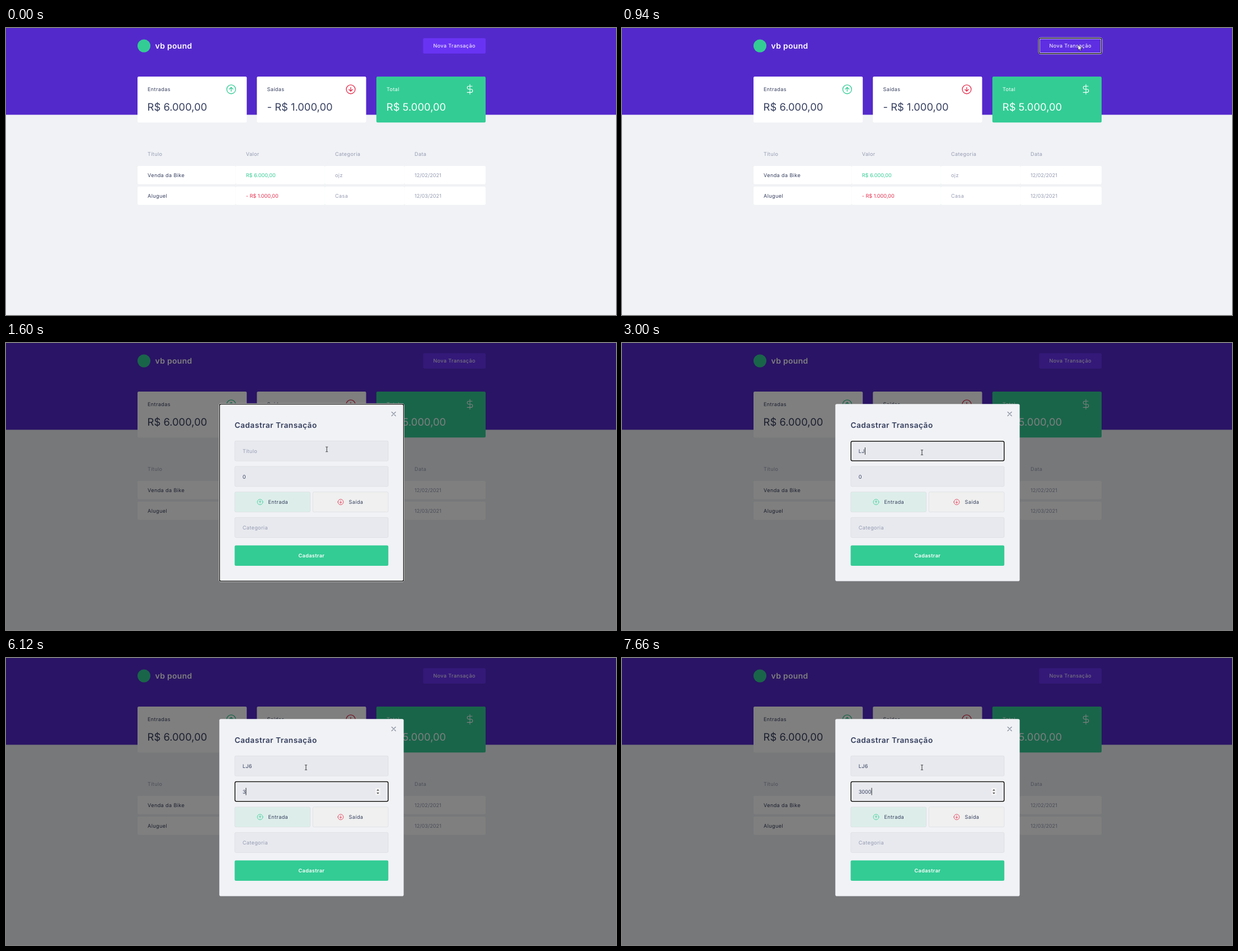
Animation of 1090x514 px, one loop 8 s. Source, as an HTML page:

```html
<!DOCTYPE html>
<html lang="pt-BR">
<head>
<meta charset="utf-8">
<title>Transações</title>
<style>
  html, body { margin: 0; width: 100%; height: 100%; overflow: hidden; background: #f0f2f5; }
  svg { display: block; width: 100%; height: 100%; }
  text {
    font: 400 9.14px Inter, "Open Sans", sans-serif;
    letter-spacing: .04em;
    fill: #363f5f;
    text-rendering: geometricPrecision;
    white-space: pre;
  }
  .num text, text.num { letter-spacing: 0; }
  .muted, .muted text { fill: #969cb3; }
  .light { fill: #fff; }
  text.money { font-size: 18.4px; letter-spacing: 0; }
  .brand { font-size: 14px; font-weight: 600; letter-spacing: .02em; }
  .title { font-size: 13.7px; font-weight: 600; letter-spacing: .035em; }
  .strong { font-weight: 600; }
  .middle { text-anchor: middle; }
  .green { fill: #33cc95; }
  .red { fill: #e52e4d; }
  .icon { fill: none; stroke-width: 1.35; stroke-linecap: round; stroke-linejoin: round; }
  .up { stroke: #33cc95; }
  .down { stroke: #e52e4d; }
  .field { fill: #e7e9ee; stroke: #d7d9dd; stroke-width: .6; }
</style>
</head>
<body>
<svg viewBox="0 0 1090 514" preserveAspectRatio="none">
  <defs>
    <g id="arrow">
      <circle r="7.9"/>
      <path d="M0 3.5V-3.4M-3.2-.3 0-3.5 3.2-.3"/>
    </g>
  </defs>

  <rect width="1090" height="155.4" fill="#5429cc"/>
  <circle class="green" cx="246.5" cy="32" r="11.5"/>
  <text class="brand light" x="266.6" y="36.8">vb pound</text>
  <rect id="newButton" x="745.3" y="18.3" width="111.7" height="27.4" rx="2.3"/>
  <text class="light middle" x="801.2" y="35.3">Nova Transação</text>

  <g fill="#fff">
    <rect x="235" y="87" width="195.2" height="82.2" rx="2.3"/>
    <rect x="448.3" y="87" width="195.2" height="82.2" rx="2.3"/>
    <rect class="green" x="661.8" y="87" width="195.2" height="82.2" rx="2.3"/>
  </g>
  <text x="253" y="113.3">Entradas</text>
  <text x="466.5" y="113.3">Saídas</text>
  <text class="light" x="680" y="113.3">Total</text>
  <text class="money" x="252.6" y="148.4">R$ 6.000,00</text>
  <text class="money" x="466.5" y="148.4">- R$ 1.000,00</text>
  <text class="money light" x="679.8" y="148.4">R$ 5.000,00</text>
  <use href="#arrow" class="icon up" transform="translate(402.4 109.8)"/>
  <use href="#arrow" class="icon down" transform="translate(616 109.8) rotate(180)"/>
  <path class="icon" stroke="#fff" stroke-width="1.6" transform="translate(819.4 100.2) scale(.8)"
        d="M12 1V23M17 5H9.5a3.5 3.5 0 0 0 0 7h5a3.5 3.5 0 0 1 0 7H6"/>

  <g class="muted">
    <text x="253" y="229.4">Título</text>
    <text x="428.7" y="229.4">Valor</text>
    <text x="588" y="229.4">Categoria</text>
    <text x="730" y="229.4">Data</text>
  </g>
  <g id="cells" fill="#fff"></g>
  <text x="253" y="266.6">Venda da Bike</text>
  <text class="num green" x="428.7" y="266.6">R$ 6.000,00</text>
  <text class="muted" x="588" y="266.6">ojz</text>
  <text class="num muted" x="730" y="266.6">12/02/2021</text>
  <text x="253" y="303.6">Aluguel</text>
  <text class="num red" x="428.7" y="303.6">- R$ 1.000,00</text>
  <text class="muted" x="588" y="303.6">Casa</text>
  <text class="num muted" x="730" y="303.6">12/03/2021</text>

  <g id="modal">
    <rect width="1090" height="514" opacity=".5"/>
    <rect x="381.2" y="109.3" width="329.4" height="317.2" rx="2.8" fill="#f0f2f5"/>
    <path id="close" class="icon" stroke="#8c92a0" stroke-width="1" d="m689.2 123.6 7 7m0-7-7 7"/>
    <text class="title" x="408.4" y="151.6">Cadastrar Transação</text>
    <rect class="field" x="408.8" y="175.3" width="274.2" height="36" rx="2.3"/>
    <rect class="field" x="408.8" y="221" width="274.2" height="36" rx="2.3"/>
    <rect class="field" x="408.8" y="266.7" width="134.8" height="36" rx="2.3" style="fill:#ddeeea"/>
    <rect class="field" x="548.2" y="266.7" width="134.8" height="36" rx="2.3" style="fill:#eff0ef"/>
    <rect class="field" x="408.8" y="312.4" width="274.2" height="36" rx="2.3"/>
    <rect class="green" x="408.6" y="362.5" width="274.6" height="36.6" rx="2.3"/>
    <use href="#arrow" class="icon up" transform="translate(454 284.8) scale(.62)"/>
    <use href="#arrow" class="icon down" transform="translate(598 284.8) scale(.62) rotate(180)"/>
    <text x="468.4" y="288.3">Entrada</text>
    <text x="612.6" y="288.3">Saída</text>
    <text class="muted" x="422.7" y="334">Categoria</text>
    <text class="strong light middle" x="545.9" y="384.2">Cadastrar</text>

    <rect id="selection" x="422.7" y="232.3" width="6.2" height="13.4" fill="#3390ff"/>
    <text id="name" x="422.7" y="196.8"></text>
    <text id="value" class="num" x="422.7" y="242.5"></text>
    <g id="spinner">
      <rect x="660" y="233" width="9" height="12.4" fill="#f3f3f4"/>
      <path d="M662.2 237.4h4.6l-2.3-2.5zM662.2 241h4.6l-2.3 2.5z" fill="#444"/>
    </g>
    <rect id="caret" width=".9" height="13" fill="#111"/>
  </g>

  <g id="ring" fill="none">
    <rect class="edge" rx="3" stroke="#fff" stroke-width="3"/>
    <rect class="edge" rx="2.5" stroke="#101010" stroke-width="1.5"/>
  </g>

  <g id="pointer">
    <path id="arrowCursor" d="M0 0V9.6L2.2 7.6 3.7 11 5.3 10.3 3.8 7H6.9Z" fill="#fff" stroke="#000" stroke-width=".6"/>
    <path id="textCursor" d="M-2-4.3H-.5L0-3.9.5-4.3H2M0-3.9V3.9M-2 4.3H-.5L0 3.9.5 4.3H2" fill="none" stroke="#222" stroke-width=".9"/>
  </g>
</svg>
<script>
const LOOP = 8000, OPEN = 990;
const $ = id => document.getElementById(id);
const show = (id, on) => $(id).style.display = on ? '' : 'none';
const setAttrs = (el, attrs) => Object.entries(attrs).forEach(([k, v]) => el.setAttribute(k, v));

// Table cells: each one has its own rounded corners.
const columns = [235, 410.5, 569.8, 711.8, 857];
for (const y of [247, 284]) {
  columns.slice(0, -1).forEach((x, i) => {
    const cell = document.createElementNS('http://www.w3.org/2000/svg', 'rect');
    setAttrs(cell, { x, y, width: columns[i + 1] - x, height: 32.8, rx: 2.3 });
    $('cells').append(cell);
  });
}

const boxes = {
  button: [745.3, 18.3, 111.7, 27.4],
  dialog: [381.5, 109.5, 329, 317],
  name: [409.2, 175.9, 273.6, 35.2],
  value: [409.2, 221.5, 273.6, 35.2]
};

// Start time, focused element, title, amount, caret shown
const states = [
  [0, null, '', '0', false],
  [840, 'button', '', '0', false],
  [OPEN, 'dialog', '', '0', false],
  [1680, 'name', '', '0', true],
  [2150, 'name', '', '0', false],
  [2680, 'name', '', '0', true],
  [2850, 'name', 'L', '0', true],
  [3000, 'name', 'LJ', '0', true],
  [3560, 'name', 'LJ', '0', false],
  [4010, 'name', 'LJ6', '0', true],
  [4330, 'value', 'LJ6', '0', false],
  [6120, 'value', 'LJ6', '3', true],
  [6500, 'value', 'LJ6', '30', true],
  [7050, 'value', 'LJ6', '30', false],
  [7200, 'value', 'LJ6', '300', true],
  [7660, 'value', 'LJ6', '3000', true]
];

// Pointer moves: quadratic curves sampled in ten steps, as in a screen capture.
const moves = [
  { start: 70, end: 840, points: [[1000, 508], [810, 250], [815, 30]] },
  { start: OPEN, end: 1680, points: [[808, 42], [720, 175], [536, 196]] }
];

function pointerAt(t) {
  const { start, end, points: [a, b, c] } = moves[t < OPEN ? 0 : 1];
  const raw = Math.min(1, (t - start) / (end - start));
  const step = Math.floor(raw * 10 + 1e-6) / 10;
  const u = step * step * (3 - 2 * step);
  return [0, 1].map(i => (1 - u) ** 2 * a[i] + 2 * u * (1 - u) * b[i] + u * u * c[i]);
}

function drawPointer(t) {
  const [x, y] = pointerAt(t);
  const overField = t >= OPEN && x > 409 && x < 683 && y > 175;
  const overButton = t < OPEN && x > 745 && x < 857 && y < 46;
  show('pointer', t >= 70);
  show('arrowCursor', !overField);
  show('textCursor', overField);
  $('pointer').setAttribute('transform', `translate(${x} ${y})`);
  $('newButton').setAttribute('fill', overButton ? '#5e2ee2' : '#6933f4');
}

function drawForm(t) {
  const [start, focus, name, value, caret] = states.findLast(s => s[0] <= t);
  const selected = start === 4330;
  show('modal', t >= OPEN);
  show('close', t >= 1070);
  show('spinner', focus === 'value');
  show('selection', selected);
  show('caret', caret);
  $('name').textContent = name || 'Título';
  $('name').style.fill = name ? '' : '#969cb3';
  $('value').textContent = value;
  $('value').style.fill = selected ? '#fff' : '';
  if (caret) {
    const typed = focus === 'name' ? name : value;
    const width = typed ? $(focus).getComputedTextLength() : 0;
    setAttrs($('caret'), { x: 422.8 + width, y: focus === 'name' ? 187 : 232.6 });
  }
  show('ring', focus);
  if (focus) {
    const [x, y, width, height] = boxes[focus];
    document.querySelectorAll('.edge').forEach(el => setAttrs(el, { x, y, width, height }));
  }
}

const origin = performance.now();
function render() {
  const t = (performance.now() - origin) % LOOP;
  drawPointer(t);
  drawForm(t);
  requestAnimationFrame(render);
}
render();
</script>
</body>
</html>
```
